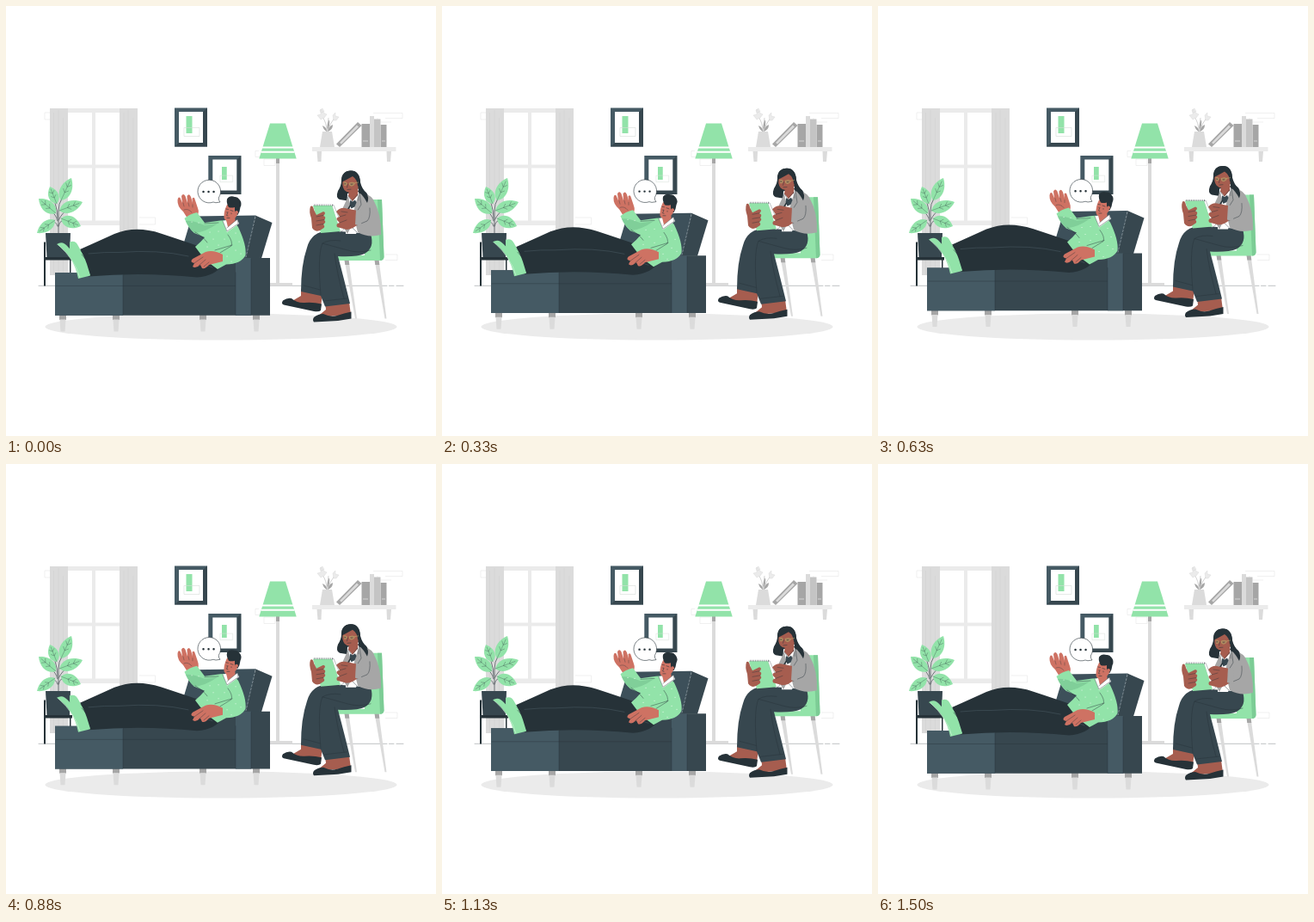
Write an HTML page that moves like this. It is 500 by 500 pixels and loops after 1.54 s.

```html
<!DOCTYPE html>
<html lang="en">
<head>
<meta charset="utf-8">
<title>Therapy session</title>
<style>
  html, body { margin: 0; width: 100%; height: 100%; overflow: hidden; background: #fff; }
  svg { display: block; width: 100%; height: 100%; }
  .green { fill: #92e3a9; }
  .ink { fill: #263238; }
  .slate { fill: #37474f; }
  .steel { fill: #455a64; }
  .pale { fill: #ebebeb; }
  .light { fill: #dbdbdb; }
  .grey { fill: #a6a6a6; }
  .white { fill: #fff; }
  .tan { fill: #ce7263; }
  .brown { fill: #a65d4f; }
  .line { fill: none; stroke: #263238; stroke-width: .6; stroke-linecap: round; stroke-linejoin: round; }
  .faint { fill: none; stroke: #e6e6e6; stroke-width: .6; }
  .fold { fill: none; stroke: #cfcfcf; stroke-width: .5; }
</style>
</head>
<body>
<svg viewBox="0 0 500 500">
  <ellipse class="pale" cx="250" cy="373" rx="204.500" ry="15.500"/>

  <!-- wall outlines -->
  <path class="faint" d="M51 124h-6v8h6M155 246h18.500v8h-18.500M294 168.500h-4v7h8M300 178h13v7.500h-13zM427 124.500h34v6h-20M441 289h14v6.500h-14M432 130v5h16"/>
  <path class="line" style="stroke-width:.3" d="M38 325.300H443M445.500 325.300H451M454 325.300H462"/>

  <!-- window -->
  <path class="pale" fill-rule="evenodd" d="M70 119h64v136h-64zM72 124v60.500h28v-60.500zM104 124v60.500h28v-60.500zM72 188.500v61h28v-61zM104 188.500v61h28v-61z"/>
  <path class="light" d="M51 119h21v194h-21zM132 119h21v194h-21z"/>
  <path class="fold" d="M55.500 124V312M61 121V312M66.500 130V312M137 124V290M142 121V290M148 130V290"/>

  <!-- pictures -->
  <g id="frame">
    <path class="steel" d="M196 118.500h38v45h-38z"/>
    <path class="slate" d="M229 123l5-4.500v45h-38l5-4.500h28z"/>
    <path class="white" d="M201 123h28v36h-28z"/>
  </g>
  <g id="art">
    <path class="green" d="M209.500 128h7v20h-7z"/>
    <path class="faint" style="stroke:#d5dcd7" d="M207 141.500h18v10h-18z"/>
  </g>
  <use href="#frame" transform="translate(39.300 55.500)"/>
  <use href="#art" transform="translate(79.200 91) scale(.82 .75)"/>

  <!-- lamp -->
  <path class="light" d="M314 177h4v145h15v3.500h-27v-3.500h8z"/>
  <path class="grey" d="M314 177h4v6h-4z"/>
  <path class="green" d="M307 136.500h18l12.700 41h-43.400z"/>
  <path d="M298 164.500h36M296.500 169.800h39" stroke="#fff" stroke-width="1.900"/>

  <!-- shelf -->
  <path class="pale" d="M356 164h97.500v5h-97.500z"/>
  <path class="light" d="M361.500 169h5.500l-.5 12h-4zM442.500 169h5.500l-1 12h-4z"/>
  <path class="grey" d="M384 160.500l25-25.500 4.500 4-25.500 25zM413.500 137h9.500v27h-9.500zM435.500 138h7v26h-7z"/>
  <path class="light" d="M423 128h5v36h-5zM388 159l20-20.500 2 2-20 20z"/>
  <path fill="#c4c4c4" d="M428 131.500h7.500v32.500h-7.500z"/>
  <path d="M415 157h6M437 157h4" stroke="#ddd" stroke-width=".8"/>
  <path class="light" d="M368 146h11l3 18h-17z"/>
  <path d="M373 146Q373 136 368 129M374 146Q377 136 382 130M373 146L375 130" fill="none" stroke="#b5b5b5" stroke-width=".6"/>
  <path class="grey" d="M373 146q-4-2-5-7q5 2 5 7M374 146q1-6 6-8q0 6-6 8M374 144q-1-7 2-12q1 7-2 12"/>
  <path class="pale" stroke="#d4d4d4" stroke-width=".4" d="M366 132l-4-5 4-1 0-6 3 4 4 2-3 4zM381 133l-1-6 3-3 0 4 4 1-3 4zM365 121l3-2 2 4-4 1z"/>

  <!-- plant -->
  <path d="M61 265V238Q61 230 65 224M60 247Q60 238 57 229M61 249Q67 238 73 236M60 250Q58 242 52 238M60 256Q58 249 52 251M61 256Q63 248 70 248" class="line"/>
  <g id="leaves"></g>
  <path class="slate" d="M46 264h29l-1 28h-26.500z"/>
  <path class="ink" d="M44 292h33v3.500h-31v30h-2v-51h2v17.500zM74 295h1.500v30h-1.500z"/>

  <g class="bob">
    <!-- sofa -->
    <path class="grey" d="M62 359h8v6h-8zM124 359h8v6h-8zM225 359h8v6h-8zM287 359h8v6h-8z"/>
    <path class="light" d="M62.500 364.500h7l-1 14h-5zM124.500 364.500h7l-1 14h-5zM225.500 364.500h7l-1 14h-5zM287.500 364.500h7l-1 14h-5z"/>
    <path fill="#3d505a" d="M218 244.500Q216 244 215 248L206 278 230 312H279L290 243.500z"/>
    <path class="slate" d="M290 243.500L309.500 252 297 293.500H279z"/>
    <path d="M290 245l-11 47" stroke="#a9b6bc" stroke-width=".6" stroke-dasharray="3 1.200"/>
    <path class="slate" d="M57 310h180v-17h70v66.700h-250z"/>
    <path class="steel" d="M57 310h79v49.700h-79zM267 293h18v66.700h-18z"/>
    <path class="line" d="M58 325.500h208.500M136 313v46M267 310v49M285 294v65" style="stroke-width:.4"/>

    <!-- patient -->
    <path class="ink" d="M86 283Q104 275 126 265Q151 255 180 264.500Q206 273 226 280L252 300Q244 314 222 315.500Q158 309 96 314.500Z"/>
    <path class="line" style="stroke:#52636c;stroke-width:.45" d="M96 288Q115 286 132 286.500Q177 283 212 291M219 295Q227 300 240 304"/>
    <path class="green" d="M74 274.500Q81 272 84 279Q91 291 94 300L98 313 87 315Q73 294 74 274.500z"/>
    <path class="green" d="M59 277Q66 272.500 72 280L90 299 98 313.500 84 317Q79 291 59 277z"/>
    <path d="M61 278Q80 295 86 316" fill="none" stroke="#d3f2dc" stroke-width=".6"/>
    <path class="line" style="stroke-width:.45" d="M87 285l7 7M88 289l5 6M90 284l5 5"/>

    <path class="tan" d="M206 239Q199 233 199.500 226Q200 221 202.500 223L205 229 204 221Q206 217 208.500 221L211 229 210.500 221Q213 217 215 222L217 229 216.500 224Q219 221 220 226L223 235Q225 240 222 245L213 250z"/>
    <path class="line" style="stroke-width:.35" d="M206 229l1 4M212 229l1 4M217 231l0 3M207 237q5-2 9 3"/>
    <path class="green" d="M207.500 247Q213 242 222 240L231 252 249 249.500Q264 248 270 257Q280 278 278.500 290Q273 300 256 300.500L246 306Q231 296 220 280Q227 274 231 269L219 264Q212 258 207.500 247z"/>
    <path fill="#80cf99" d="M209 250Q217 249 231 255L246 253Q232 263 219 264Q212 258 209 250z"/>
    <path class="line" d="M231 253L247 252M220 263Q230 269 234 275M243 284L263 278M258 266Q264 274 262 279L249 287" style="stroke-width:.45"/>
    <path d="M237 263h.1M247 262h.1M254 271h.1M241 271h.1M234 280h.1M247 278h.1M267 264h.1M271 274h.1M267 284h.1M257 291h.1M273 288h.1M262 297h.1M224 252h.1M216 251h.1" stroke="#e3f9e9" stroke-width="1.100" stroke-linecap="round"/>
    <path class="tan" d="M252 289Q241 283 232 286L217 294Q213 298 219 299L217 303Q220 306 226 301L228 305Q232 306 236 301L252 297z"/>
    <path class="line" style="stroke-width:.4" d="M219 299l10-7M224 302l8-7M230 303l6-5"/>

    <path class="tan" d="M255 245L266 243 267 253 258 262z"/>
    <path class="white" d="M252 250L256 249 258 257 269 248 271 253 257 263z"/>
    <path class="line" style="stroke-width:.4" d="M252 250l5 12 13-9-1-5-12 10"/>
    <path class="tan" d="M257 231Q253 239 253.500 246Q255 251 260.500 249.500Q269 247 270 239L267 230z"/>
    <path class="ink" d="M259 234Q256 229 257 224.500Q260 220 266 222Q269 221.500 271.500 225Q275 229 272.500 234Q272 239 269.500 243L266 240 266 234Q262 235 259 234z"/>
    <circle class="tan" cx="268" cy="240" r="2"/>
    <path class="line" d="M256 236l2.500 .5M261 237.500l3 1M257 239.500v.8M262 241v.8M257 246.500l3 0M258 240l-1.500 3.500 1.500 .5" style="stroke-width:.55"/>
  </g>

  <g id="bubble">
    <path d="M249 228Q243 229.500 241 228A13.300 13.300 0 1 1 247.300 223Q247 226 249 228z" fill="#fff" stroke="#263238" stroke-width=".6"/>
    <path d="M229.500 216h.1M235.500 216h.1M241.500 216h.1" stroke="#263238" stroke-width="2.400" stroke-linecap="round"/>
  </g>

  <g class="bob">
    <!-- chair -->
    <path class="light" d="M393.500 295h5l9.500 68.500h-2zM428.500 295h5l9 68.500h-2z"/>
    <path class="grey" d="M393.500 295h5l.8 6h-5zM428.500 295h5l.8 6h-5z"/>
    <path class="green" d="M416 226Q416 225 418 225H437L439.500 292Q439 296 435 296H386Q383 296 383 290H417z"/>
    <path fill="#7ccc95" d="M432 225h5l2.500 67q-.5 4-4.500 4z"/>

    <!-- therapist: legs and shoes -->
    <path class="brown" d="M343 329L368 335 366 350 331 344 343 337zM371 344H399L401 359 361 362 372 353z"/>
    <path class="ink" d="M322 342.500Q327 339 332 340Q338 345.500 347 345Q357 344 367 346.500L366 354Q364 356 358 355L323 347.500Q319.500 346 322 342.500zM358 362Q363 358 369 358Q377 362 385 360Q393 357 401.500 355.500L401.500 363.500 386 366 358 367.500Q356 365 358 362z"/>
    <path class="slate" d="M376 261L424 265Q429 281 417 288Q408 292 386 291Q394 321 400 346L371 349.500 366 337 343 332Q343 301 350 281Q355 262 376 261z"/>
    <path class="line" d="M424 284Q411 288 397 284L368 276Q362 289 366 336M346 325Q358 328 365 330M370 343L397 340M368 276Q376 271 389 273M382 288Q385 312 393 340" style="stroke-width:.45"/>

    <!-- hair behind -->
    <path class="ink" d="M390 203Q391 191 401 191.500Q411 191 412 205Q414 213 419 217Q424 223 419 230L388 225Q383 223 386 215Q390 209 390 203z"/>
    <!-- torso -->
    <path class="white" d="M397 218L410 216 416 240 407 265H395z"/>
    <path class="brown" d="M400 208L410 208 409 220 403 227 398 221z"/>
    <path class="grey" d="M411 218Q423 218 427 225Q437 243 436 266Q421 270 409 263L406 251Q401 239 411 218z"/>
    <path class="grey" d="M398 221l-6 13-3 17 8 14 4-8-1-25z"/>
    <path class="line" d="M411 218L413 231 408 239M423 235Q424 246 420 250L408 255M408 263L399 254" style="stroke-width:.45"/>
    <path class="slate" d="M400 226l3 1.500 3-2 1.500 3-2 5-4 2-2-5z"/>
    <path class="line" style="stroke-width:.4" d="M398 221l4 6 7-8 1 7"/>
    <path class="ink" d="M409 200Q412 212 418 217Q423 222 420 229Q416 221 410 216z"/>

    <!-- head -->
    <path class="brown" d="M392 201Q390 209 393.500 214Q398 219 405 215Q411 211 411 201L403 196z"/>
    <path class="ink" d="M390 205Q389 192 401 191.500Q412 192 412 207L409 210Q409 202 403 198Q396 202 390 205z"/>
    <path d="M392.500 205q4-.5 4 1.800t-3.500 1.600M399 206q4.500-1.500 6 0t-3 3.300q-3 0-3-3.300M405 206l5-1" fill="#92a06a" fill-opacity=".4" stroke="#c9b870" stroke-width=".5"/>
    <path class="line" d="M394 206.800h.6M401.500 207.300h.8M397.500 207l-1 4M397 213.500l4-.3" style="stroke-width:.5"/>
    <path class="white" d="M409 212l1 2-1 1z"/>

    <!-- notepad and hands -->
    <path class="white" stroke="#263238" stroke-width=".3" d="M379 232L381 231.500 393 260 388 263z"/>
    <path class="green" d="M357 232L379 232 389 262 366 264z"/>
    <path d="M358 231.500L380 231.500" stroke="#263238" stroke-width="2" stroke-dasharray=".5 1.600"/>
    <path class="brown" d="M355 247Q352 239 354 233Q357 231 358 237L361 243 369 239Q373 240 369 244Q373 245 370 249Q373 251 369 254Q372 257 368 259Q361 265 356 258z"/>
    <path class="line" d="M361 245l8-1.500M361 250l9-1.500M361 255l8-1.500" style="stroke-width:.4"/>
    <path class="ink" d="M400 231l1.500.7-13 20-1 .3z"/>
    <path class="brown" d="M384 239Q389 234 394 235L409 238 410 253Q403 260 396 260L385 257Q383 253 388 252L385 249Q383 246 388 245z"/>
    <path class="line" d="M388 245l7-2M388 252l8-3M390 239l7 1" style="stroke-width:.4"/>
    <path class="grey" d="M407 237l7 1-1 18-7-2z"/>
  </g>
</svg>
<script>
  const LOOP = 1540;

  function leaf(x1, y1, x2, y2, width) {
    const length = Math.hypot(x2 - x1, y2 - y1);
    const nx = (y1 - y2) / length * width, ny = (x2 - x1) / length * width;
    const at = (k, side) => `${x1 + (x2 - x1) * k + nx * side} ${y1 + (y2 - y1) * k + ny * side}`;
    let veins = `M${at(0, 0)}L${at(.85, 0)}`;
    for (const k of [.35, .6]) {
      veins += `M${at(k + .12, .35)}L${at(k, 0)}L${at(k + .12, -.35)}`;
    }
    return `<path class="green" d="M${at(0, 0)}C${at(.2, 1)} ${at(.65, 1)} ${at(1, 0)}C${at(.65, -1)} ${at(.2, -1)} ${at(0, 0)}"/>
      <path class="line" style="stroke-width:.3" d="${veins}"/>`;
  }

  document.getElementById("leaves").innerHTML = [
    [64, 226, 76, 200, 9], [59, 230, 51, 210, 8], [62, 238, 89, 228, 9],
    [58, 241, 38, 224, 9], [57, 249, 36, 264, 8], [64, 247, 87, 256, 9]
  ].map(args => leaf(...args)).join("");

  const bobbing = document.querySelectorAll(".bob");
  const bubble = document.getElementById("bubble");

  function draw() {
    const angle = (performance.now() % LOOP + 40) / LOOP * 2 * Math.PI;
    const rise = (1 - Math.cos(angle)) / 2;
    for (const group of bobbing) group.setAttribute("transform", `translate(0 ${-5.7 * rise})`);
    bubble.setAttribute("transform", `translate(0 ${-.8 * rise})`);
    requestAnimationFrame(draw);
  }
  draw();
</script>
</body>
</html>
```
